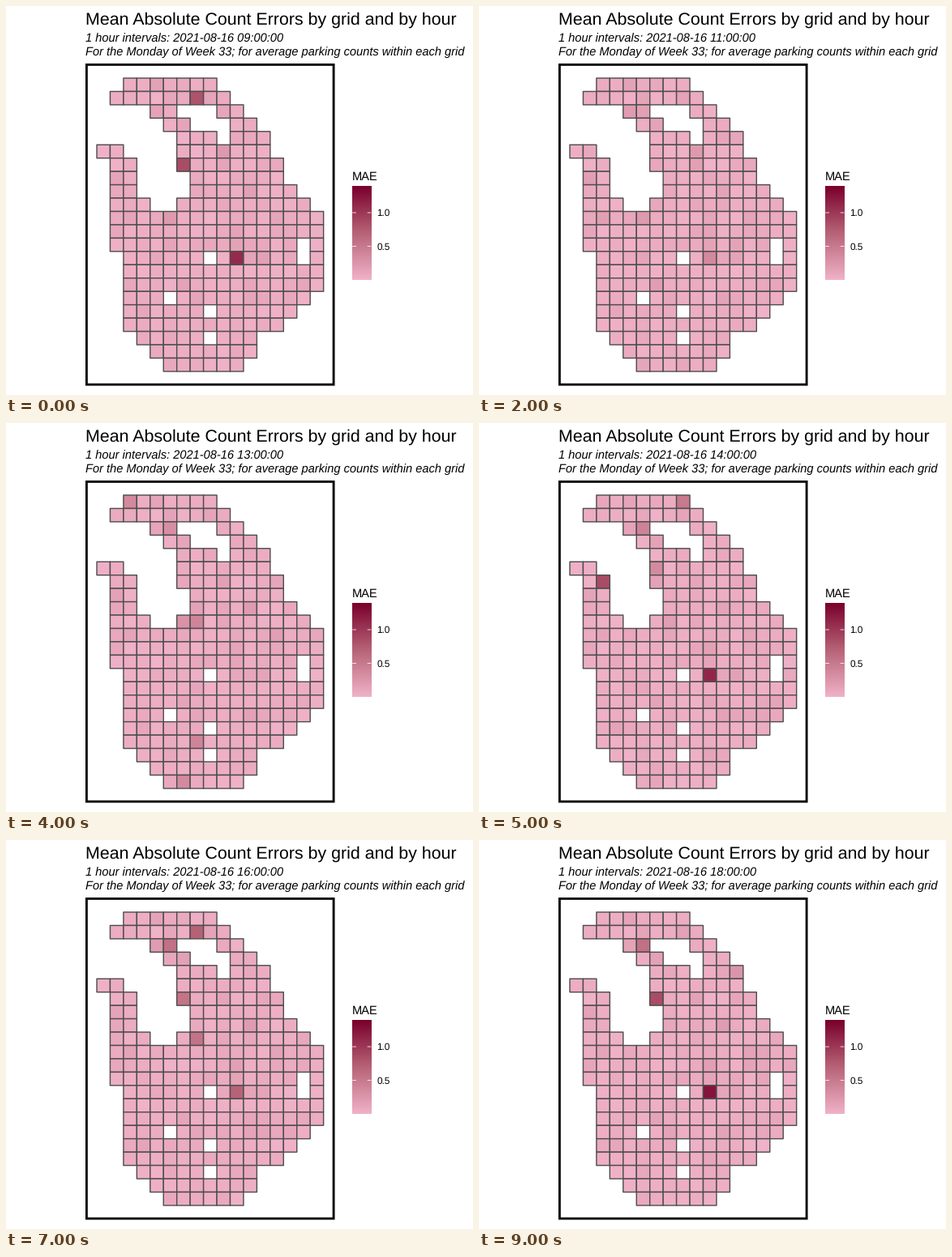
Write a matplotlib script that moves like this. It is 576 by 480 pixels and loops after 10 s.

```python
import numpy as np
import matplotlib.pyplot as plt
from matplotlib.animation import FuncAnimation
from matplotlib.collections import PatchCollection
from matplotlib.colors import LinearSegmentedColormap
from matplotlib.patches import Rectangle

W, H, DPI = 576, 480, 96
FIRST_HOUR, N_HOURS = 9, 10
VMAX = 1.385
ROWS, COLS, STEP = 22, 17, 16.45
X0, Y0 = 112.0, 89.0

plt.rcParams["font.family"] = "Liberation Sans"
plt.rcParams["text.hinting"] = "none"
cmap = LinearSegmentedColormap.from_list(
    "mae", ["#f0b2c8", "#b76377", "#7a002d"], N=300)


def through(rows, *points):
    """Column of a coastline in each row, straight between key points."""
    r, c = zip(*points)
    return np.rint(np.interp(rows, r, c)).astype(int)


rows = np.arange(ROWS)
west = through(rows, (0, 2), (1, 1), (2, 4), (4, 6), (5, 0), (6, 1),
               (12, 1), (13, 2), (18, 2), (21, 5))
east = through(rows, (0, 8), (4, 12), (5, 12), (6, 13), (7, 13), (10, 16),
               (15, 16), (18, 13), (19, 11), (20, 11), (21, 10))

grid = np.zeros((ROWS, COLS), bool)
for r in rows:
    grid[r, west[r]:east[r] + 1] = True

# the bay, the lake and single holes
bay = np.arange(5, 10)
bay_west = through(bay, (5, 2), (6, 3), (8, 3), (9, 4))
bay_east = through(bay, (5, 5), (6, 5), (7, 6), (8, 6), (9, 5))
for r, a, b in zip(bay, bay_west, bay_east):
    grid[r, a:b + 1] = False
grid[2, 6:9] = grid[3, 7:10] = grid[4, 9] = False
grid[12:14, 15] = False
for r, c in (13, 8), (16, 5), (17, 8), (19, 8):
    grid[r, c] = False

# busy cells: (row, column) -> pulses of (hour, height, width in hours)
PULSES = {
    (13, 10): [(9.6, 1.4, 1.2), (14, 1.0, 0.6), (18, 1.25, 2.6)],
    (6, 6): [(9, 0.85, 1.15), (12, 0.4, 0.7), (18, 0.85, 3)],
    (2, 5): [(10, 1.15, 0.5), (17, 0.6, 5)],
    (1, 7): [(9, 0.8, 0.95), (12, 0.55, 0.6), (16, 0.7, 1)],
    (9, 6): [(10, 0.6, 0.6), (12.4, 0.4, 1)],
    (9, 7): [(13, 0.4, 1.1), (16, 0.55, 0.8)],
    (18, 7): [(10, 0.6, 0.5), (13, 0.4, 0.6)],
    (4, 12): [(11.8, 0.4, 0.7), (18, 0.25, 0.7)],
    (6, 2): [(14, 0.85, 0.4)],
    (0, 2): [(12.6, 0.4, 1.2)],
    (0, 8): [(14, 0.5, 0.5)],
    (21, 6): [(12.7, 0.37, 1.2)],
    (5, 6): [(14, 0.35, 0.8)],
    (5, 9): [(10, 0.25, 2.8)],
    (10, 5): [(10, 0.25, 2.5)],
}

# quiet background with a little hourly variation
rng = np.random.default_rng(33)
base = np.minimum(rng.exponential(0.04, grid.shape), 0.12)
noise = np.minimum(rng.exponential(0.02, (N_HOURS, *grid.shape)), 0.08)


def errors(i):
    hour = FIRST_HOUR + i
    mae = base + noise[i]
    for cell, pulses in PULSES.items():
        mae[cell] = max(0.05, sum(h * np.exp(-((hour - t) / w) ** 2)
                                  for t, h, w in pulses))
    return mae[grid]


fig = plt.figure(figsize=(W / DPI, H / DPI), dpi=DPI, facecolor="white")
ax = fig.add_axes([0, 0, 1, 1])


def px(n):
    return n * 72 / DPI


def label(x, y, text, size, **kw):
    return ax.text(x, y, text, fontsize=size, color="black",
                   va="baseline", ha="left", **kw)


# map cells
tiles = PatchCollection(
    [Rectangle((X0 + c * STEP, Y0 + r * STEP), STEP, STEP)
     for r, c in np.argwhere(grid)],
    cmap=cmap, edgecolor="#4d4d4d", linewidth=px(1.42), snap=False)
tiles.set_clim(0, VMAX)
ax.add_collection(tiles)

# panel frame
ax.add_patch(Rectangle((99.4, 72.4), 304.7, 394.7, fill=False,
                       edgecolor="black", linewidth=px(2.85),
                       joinstyle="miter", snap=False))

# headings
label(98, 23, "Mean Absolute Count Errors by grid and by hour", 16)
stamp = label(98, 45, "", 11, style="italic")
label(98, 61, "For the Monday of Week 33; for average parking counts "
      "within each grid", 11, style="italic")

# colour bar
BX, BY, BW, BH = 427.3, 223, 23.04, 115.2
label(427, 215, "MAE", 11)
ax.imshow(np.linspace(1, 0, 300)[:, None], cmap=cmap, aspect="auto",
          extent=(BX, BX + BW, BY + BH, BY), interpolation="bilinear")
for v in (0.5, 1.0):
    y = BY + BH * (1 - v / VMAX)
    for x in (BX, BX + BW * 0.8):
        ax.plot([x, x + BW / 5], [y, y], color="white", linewidth=px(0.8),
                solid_capstyle="butt", snap=False)
    label(457.3, y + 4.2, f"{v:.1f}", 8.8)

ax.set_xlim(0, W)
ax.set_ylim(H, 0)
ax.axis("off")


def draw(i):
    tiles.set_array(errors(i))
    stamp.set_text(
        f"1 hour intervals: 2021-08-16 {FIRST_HOUR + i:02d}:00:00")
    return tiles, stamp


anim = FuncAnimation(fig, draw, frames=N_HOURS, interval=1000,
                     repeat=True, repeat_delay=0, blit=False)
plt.show()
```
